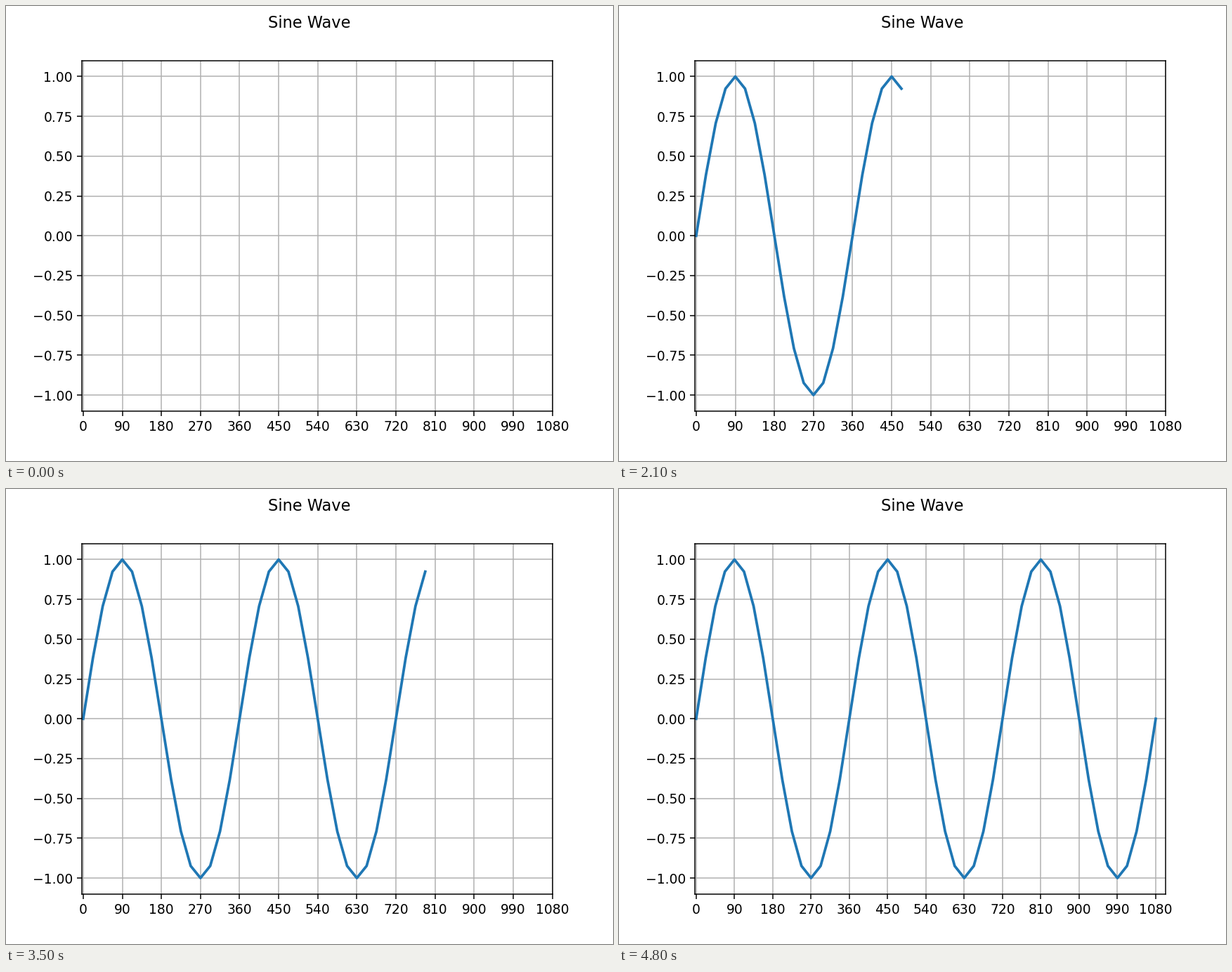
Write a matplotlib script that moves like this. It is 864x648 px and loops after 4900 ms.

```python
import numpy as np
import matplotlib.pyplot as plt
from matplotlib.animation import FuncAnimation
from matplotlib.ticker import MultipleLocator

STEP = 22.5      # degrees added per frame
FRAMES = 49
X_MIN, X_MAX = -3, 1080

plt.rcParams["font.family"] = "DejaVu Sans"

fig, ax = plt.subplots(figsize=(6.4, 4.8), dpi=135)
fig.suptitle("Sine Wave")
ax.set_ylim(-1.1, 1.1)
ax.xaxis.set_major_locator(MultipleLocator(90))
ax.yaxis.set_major_locator(MultipleLocator(0.25))
ax.grid()
line, = ax.plot([], [], lw=2)


def update(i):
    x = np.arange(i + 1) * STEP
    line.set_data(x, np.sin(np.radians(x)))
    # the axis widens by one step once the curve reaches its edge
    right = X_MAX if x[-1] < X_MAX else x[-1] + STEP
    ax.set_xlim(X_MIN, right)
    return line,


anim = FuncAnimation(fig, update, frames=FRAMES, interval=100,
                     repeat=True, repeat_delay=0, blit=False)
plt.show()
```
